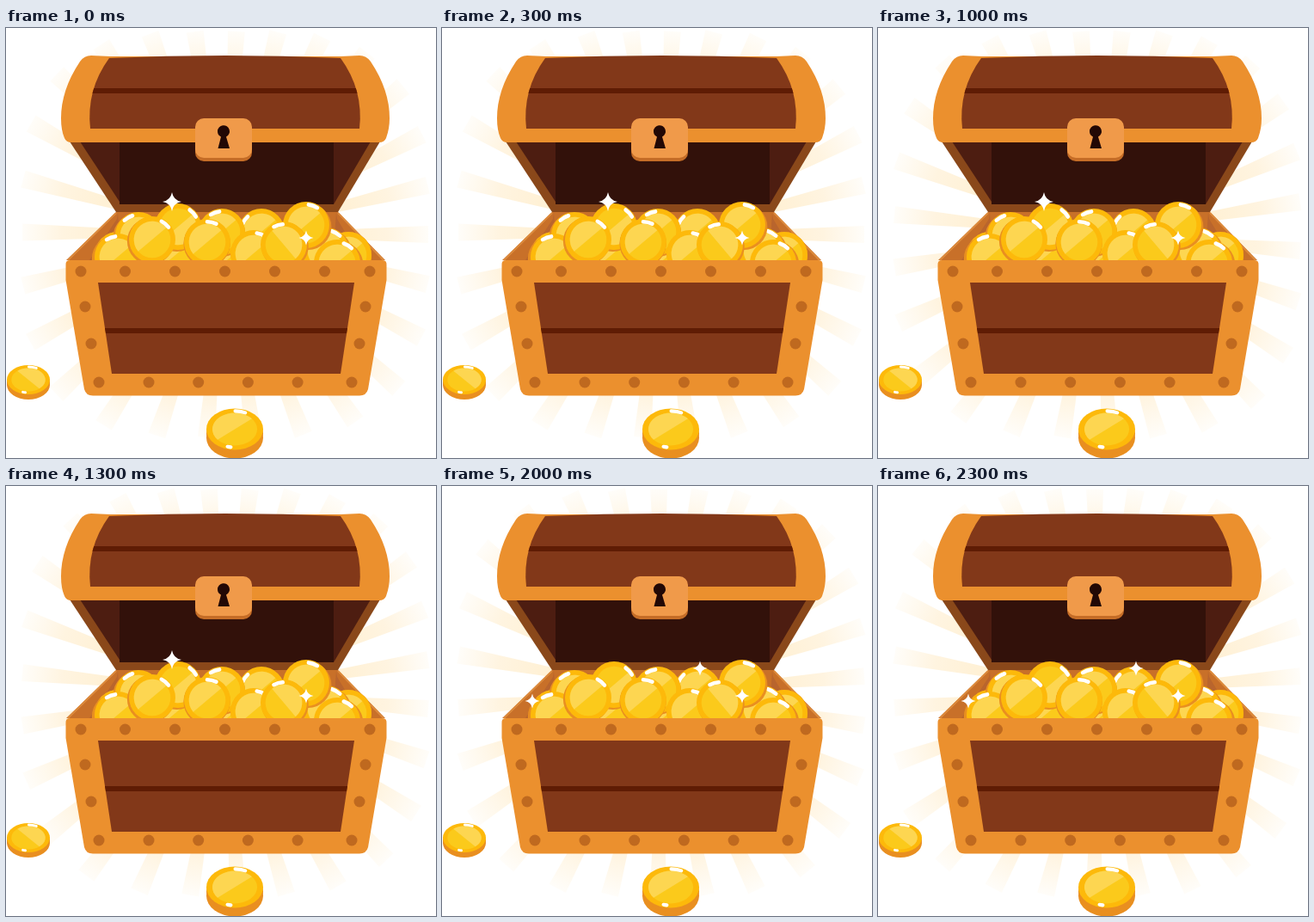
An HTML page for the animation above (2.5 s loop, 500 by 500 pixels).

```html
<!DOCTYPE html>
<html lang="en">
<head>
<meta charset="utf-8">
<title>Treasure chest</title>
<style>
html, body { margin: 0; width: 100%; height: 100%; overflow: hidden; background: #fff; }
svg { display: block; width: 100vw; height: 100vh; }
</style>
</head>
<body>
<svg viewBox="0 0 500 500" xmlns="http://www.w3.org/2000/svg">
  <defs>
    <linearGradient id="glow">
      <stop offset=".6" stop-color="#fff1d6"/>
      <stop offset=".8" stop-color="#fff4e0"/>
      <stop offset="1" stop-color="#fffdf9"/>
    </linearGradient>
    <clipPath id="inside"><path d="M60 180H450V270H60Z"/></clipPath>
    <path id="wood" d="M120 35Q255 29 389 35Q416 72 411 117H98Q93 72 120 35Z"/>
    <clipPath id="lid"><use href="#wood"/></clipPath>
  </defs>
  <g id="rays" fill="url(#glow)"></g>

  <!-- open interior -->
  <path fill="#8a481a" d="M74 132H435L386 214H128Z"/>
  <path fill="#4d1d11" d="M86 132H424L381 205H134Z"/>
  <path fill="#32110a" d="M132 132H381V205H132Z"/>
  <path fill="#c87029" d="M128 214H386L441 270H70Z"/>
  <path fill="#b9652d" d="M130 215L134 270H97L129 222ZM384 215L380 270H414L385 222Z"/>
  <path fill="none" stroke="#dc8a3c" stroke-width="2" d="M128 215L72 270M386 215L439 270"/>

  <!-- lid -->
  <path fill="#eb902e" d="M121 33L99 32Q91 32 86 39Q64 72 64 105Q64 119 68 128Q70 133 76 133H434Q440 133 442 128Q446 117 446 105Q446 72 424 39Q419 32 411 32L389 33Z"/>
  <use href="#wood" fill="#823819"/>
  <path fill="#5f1c04" clip-path="url(#lid)" d="M90 70H420V76H90Z"/>
  <rect x="220" y="110" width="66" height="45" rx="10" fill="#c56d27"/>
  <rect x="220" y="105" width="66" height="46" rx="10" fill="#f09a4a"/>
  <path fill="#220805" d="M246 120A7 7 0 1 1 256 126.500L260 140H246.500L250 126.500A7 7 0 0 1 246 120Z"/>

  <g id="pile" clip-path="url(#inside)"></g>

  <!-- front -->
  <path fill="#eb902e" d="M74 270H438Q443 270 442.500 276V293L421 420Q419 427.500 411 427.500H101Q93 427.500 91 420L69.500 293V276Q69 270 74 270Z"/>
  <path fill="#823819" d="M107 296H405L389 402H123Z"/>
  <path fill="#5f1c04" d="M115 349H397L396 355H116Z"/>
  <g id="rivets" fill="#bf691f"></g>
  <g id="loose"></g>
  <g id="stars" fill="#fff"></g>
</svg>
<script>
const NS = 'http://www.w3.org/2000/svg';
const { abs, cos, sin, PI } = Math;
const rad = PI / 180;
const $ = id => document.getElementById(id);

function add(parent, tag, attrs) {
  const el = document.createElementNS(NS, tag);
  for (const key in attrs) el.setAttribute(key, attrs[key]);
  parent.appendChild(el);
  return el;
}

// arc around an angle, reaching `spread` degrees to both sides
function arc(rx, ry, mid, spread) {
  const at = a => `${rx * cos(a * rad)} ${ry * sin(a * rad)}`;
  return `M${at(mid - spread)}A${rx} ${ry} 0 0 1 ${at(mid + spread)}`;
}

function coin(parent, x, y, rx, ry, [dx, dy], light = 230) {
  const g = add(parent, 'g', { transform: `translate(${x} ${y})` });
  const disc = (k, fill, cx = 0, cy = 0) =>
    add(g, 'ellipse', { cx, cy, rx: rx * k, ry: ry * k, fill });
  disc(1, '#e98f20', dx, dy);
  disc(1, '#e98f20', dx / 2, dy / 2);
  disc(1, '#fdb90a');
  disc(0.79, '#fbca1b');
  add(g, 'path', { d: arc(rx * 0.79, ry * 0.79, light, 90) + 'Z', fill: '#fdd651' });
  return (angle, spread) => add(g, 'path', {
    d: arc(rx * 0.88, ry * 0.88, angle, spread), fill: 'none',
    stroke: '#fff', 'stroke-width': ry * 0.17, 'stroke-linecap': 'round'
  });
}

// a low layer fills the gaps, then coins from back to front: x, y, shine angle
for (let x = 130; x < 400; x += 67) coin($('pile'), x, 264, 27, 27, [0, 0]);
[
  [154, 241, 240], [297, 237, 215], [200, 231, 318, 50], [251, 237, 250],
  [372, 259, 300], [349, 229, 290], [130, 266, 250], [170, 246, 310],
  [385, 273, 302], [234, 249, 283], [288, 262, 292], [323, 252, 254, 320]
].forEach(([x, y, shine, light]) =>
  coin($('pile'), x, y, 27, 27, [(x - 255) / 40, 2], light)(shine, 13));

function looseCoin(x, y, rx, ry, edge, light) {
  const gleam = coin($('loose'), x, y, rx, ry, [0, edge], light);
  gleam(283, 12);
  gleam(103, 4);
}
looseCoin(26, 409, 25, 17, 6, 320);
looseCoin(266, 466.5, 33, 24, 10);

const rivet = (cx, cy) => add($('rivets'), 'circle', { cx, cy, r: 6.5 });
for (let i = 0; i < 5; i++) rivet(138.5 + 58 * i, 283);
for (let i = 0; i < 4; i++) rivet(166 + 57.7 * i, 412);
for (let k = 0; k < 4; k++) {
  const dx = 168 - k * (4 + k), y = 283 + k * (40 + k);
  rivet(255 - dx, y);
  rivet(255 + dx, y);
}

// x, y, size, steps in which the star is lit
const stars = [
  [193, 202, 11, [0, 2, 3]], [105, 250, 8.5, [1, 3, 4]],
  [300, 212, 8.5, [1, 3, 4]], [349, 244, 8.5, [0, 2, 4]]
].map(([x, y, s, lit]) => {
  const q = s * 0.15;
  const el = add($('stars'), 'path', {
    transform: `translate(${x} ${y})`,
    d: `M0 ${-s}Q${q} ${-q} ${s} 0Q${q} ${q} 0 ${s}Q${-q} ${q} ${-s} 0Q${-q} ${-q} 0 ${-s}Z`
  });
  return { el, lit };
});

const COUNT = 27;
const rays = Array.from({ length: COUNT }, () =>
  add($('rays'), 'path', { d: 'M0 0L1 -.042V.042Z' }));

// rays spread unevenly around the chest and end on a rounded square
function placeRay(el, turn) {
  const u = turn * 2 * PI;
  const a = u + (-4 * (1 - cos(u)) - 2 * sin(u) + 2 * sin(2 * u)) * rad;
  const p = 3.3;
  const r = 236 / (abs(cos(a)) ** p + abs(sin(a)) ** p) ** (1 / p);
  el.setAttribute('transform', `translate(255 240) rotate(${-a / rad}) scale(${r})`);
}

const STEP = 500, STEPS = 5;
let shown = -1;

function draw(t) {
  const step = Math.floor(t / STEP) % STEPS;
  if (step === shown) return;
  shown = step;
  rays.forEach((el, i) => placeRay(el, (i + (step % 3) / 3) / COUNT));
  stars.forEach(({ el, lit }) =>
    el.setAttribute('visibility', lit.includes(step) ? 'visible' : 'hidden'));
}

const start = performance.now();
function tick() {
  draw(performance.now() - start);
  requestAnimationFrame(tick);
}
tick();
</script>
</body>
</html>
```
